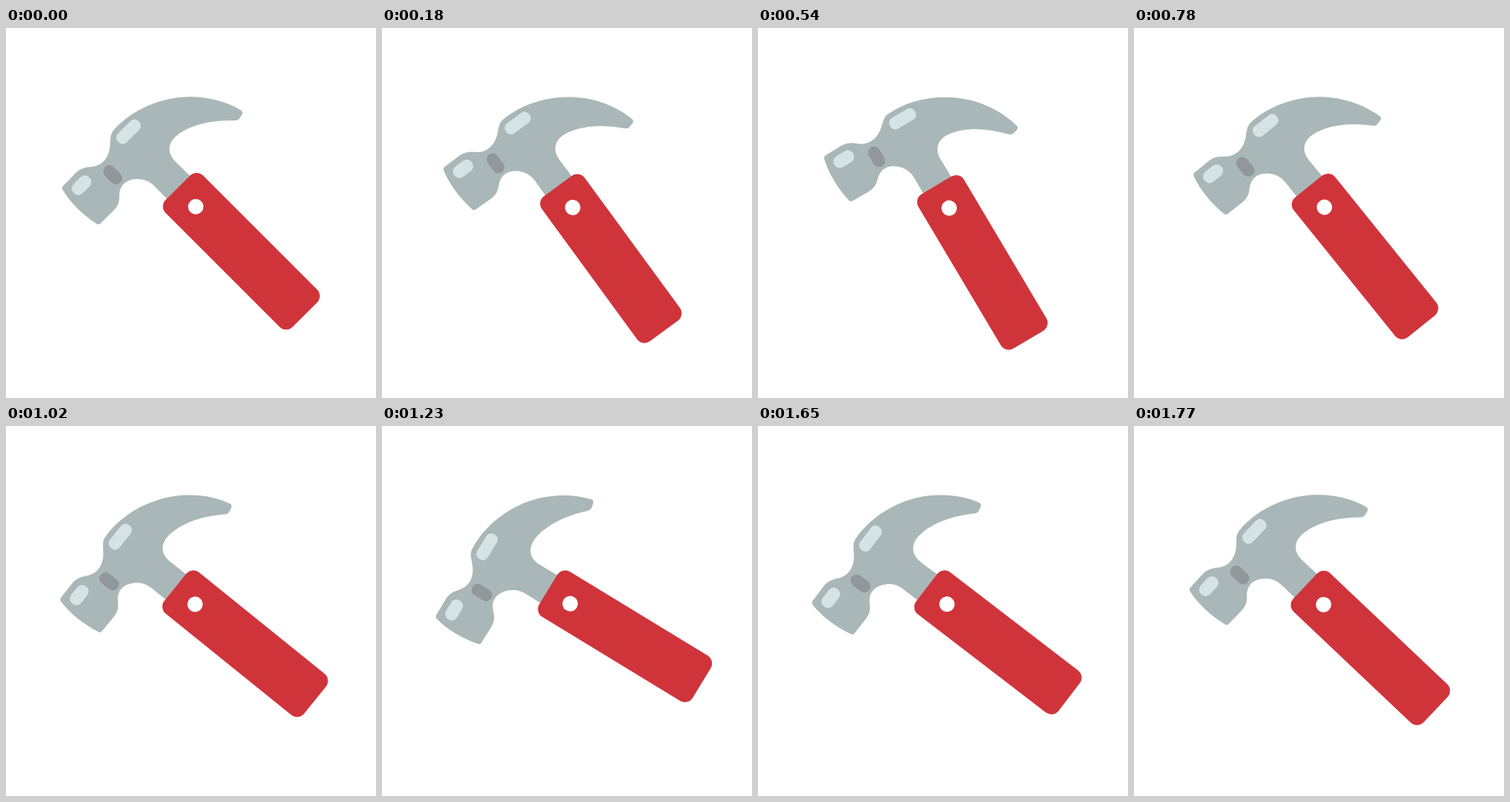
An HTML page for the animation above (1.8 s loop, 480 by 480 pixels).

```html
<!DOCTYPE html>
<html lang="en">
<head>
<meta charset="utf-8">
<title>Swinging hammer</title>
<style>
  html, body { margin: 0; width: 100%; height: 100%; overflow: hidden; background: #fff; }
  svg { display: block; width: 100vw; height: 100vh; }
  .steel { fill: #aab7b8; }
  .shine { fill: #d5e3e4; }
  .shade { fill: #929899; }
  .grip { fill: #d0343b; }
  .badge { fill: #fff; }
</style>
</head>
<body>
<svg viewBox="0 0 480 480">
  <g id="hammer">
    <path class="steel" d="M245 198 L222 175.5 C215 169 212 163 212 157
      C212 146 221 138 235 131 C253 122.5 274 119.5 297 120
      C300 120 302 119 303.500 116.500 L306 112.500
      C307.500 110 307 108 304.500 106.500
      C287 96 264 89.500 240 89.300 C201 89 161 107 138.500 134
      C135 139 135.500 145 135 152 C134 167 126 178 112 180
      C104 180.500 97 181.500 90.500 188 L74 205
      C72.500 206.500 72.500 208 73.500 210
      C83 226 99 242 117.500 254 C119.500 255.300 121 255 122.500 253.500
      L139 237.500 C145.500 231 147 226 147 218
      C147 204 156 196 171 196 C180 196 187 199.500 193 205.500 L215 228 Z"/>
    <g transform="translate(159 134.500) rotate(-45)">
      <rect class="shine" x="-18.700" y="-8" width="37.400" height="16" rx="7"/>
    </g>
    <g transform="translate(98 204) rotate(-45)">
      <rect class="shine" x="-14.300" y="-8.300" width="28.600" height="16.600" rx="8"/>
    </g>
    <g transform="translate(138.500 190.500) rotate(45)">
      <rect class="shade" x="-14.200" y="-8" width="28.400" height="16" rx="8"/>
    </g>
    <g transform="translate(240 240) rotate(45)">
      <rect class="grip" x="-35.200" y="-45.500" width="233" height="68.800" rx="12"/>
    </g>
    <circle class="badge" cx="246.200" cy="231.800" r="10"/>
  </g>
</svg>
<script>
  const LOOP = 1800, STEP = 30, SWING = 15;
  const hammer = document.getElementById('hammer');
  const start = performance.now();

  function draw(now) {
    const elapsed = Math.max(0, now - start) % LOOP;
    const time = Math.floor(elapsed / STEP) * STEP;
    const angle = SWING * Math.sin(2 * Math.PI * time / LOOP);
    hammer.setAttribute('transform', `rotate(${angle} 240 240)`);
    requestAnimationFrame(draw);
  }
  draw(start);
</script>
</body>
</html>
```
